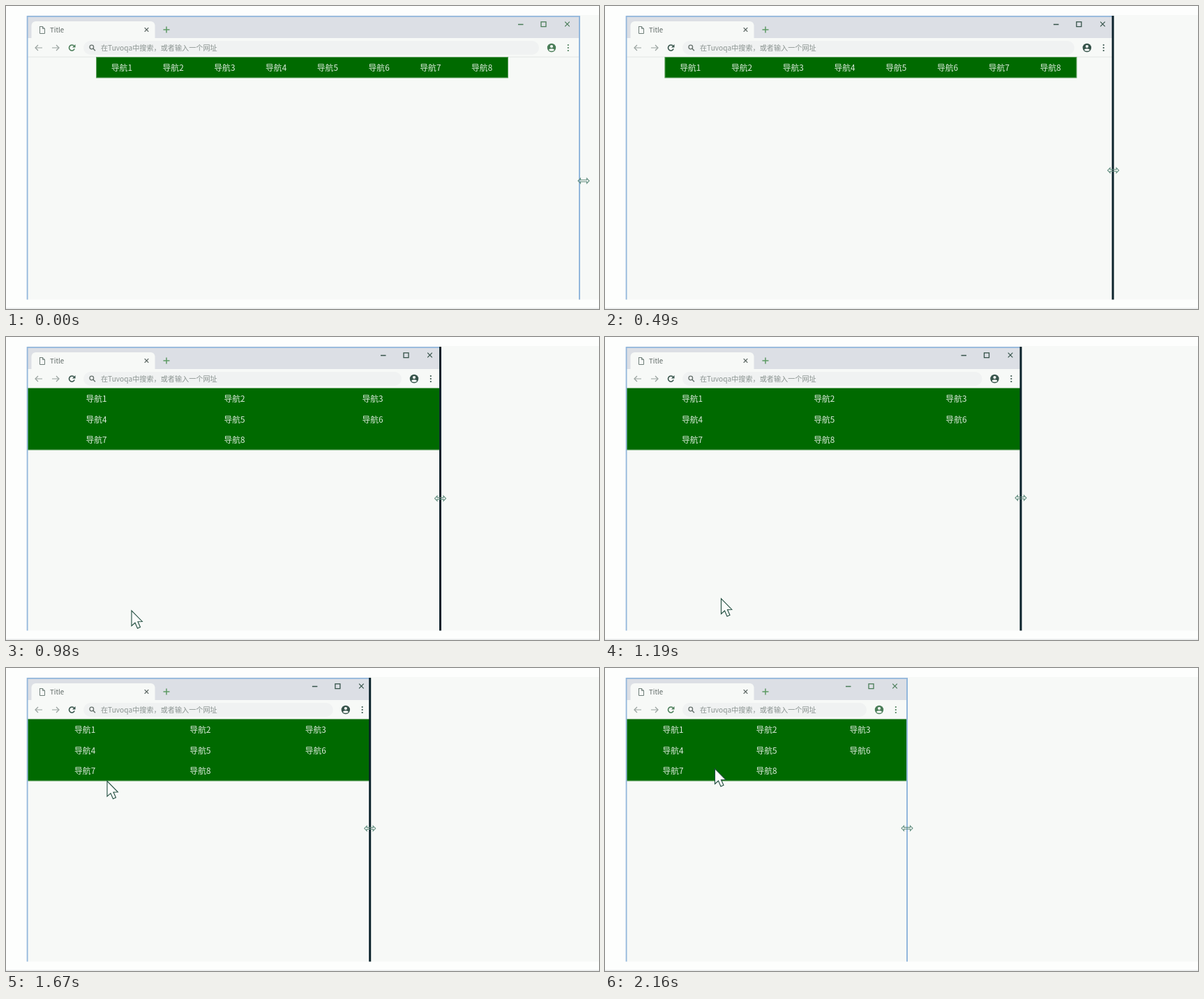
Write an HTML page with a canvas that moves like this. It is 850 px wide and 435 px high and loops after 2230 ms.

```html
<!DOCTYPE html>
<html lang="zh">
<head>
<meta charset="utf-8">
<title>Responsive navigation</title>
<style>
html, body { margin: 0; width: 100%; height: 100%; overflow: hidden; background: #fdfefd; }
canvas { display: block; }
</style>
</head>
<body>
<canvas id="stage" width="850" height="435"></canvas>
<script>
const ctx = document.getElementById('stage').getContext('2d');
const LOOP = 2230, STEP = 70, LAYOUT_DELAY = 20;
const LEFT = 31, TOP = 15, BOTTOM = 421.5;
const NAV_WIDTH = 590, BREAKPOINT = 600, NAV_TOP = 73.5, ROW = 29.5;
const FONT = '"Noto Sans CJK SC", "Noto Sans CJK", "Noto Sans", sans-serif';
const PAPER = '#f7f9f7', BLUE = '#93b7dc';

// Key points: time, then the values at that time
const edgePath = [
  [-20, 818], [0, 822], [140, 825], [280, 758], [490, 728], [770, 649],
  [1190, 596], [1470, 558], [1740, 488], [1880, 478], [2020, 433]
];
const pointerPath = [[910, 184, 398], [1190, 166, 375], [1470, 131, 181], [1740, 157, 144]];

function sample(keys, t) {
  const next = keys.findIndex(k => k[0] > t);
  if (next < 0) return keys[keys.length - 1].slice(1);
  const a = keys[Math.max(next - 1, 0)], b = keys[next];
  const p = a === b ? 0 : (t - a[0]) / (b[0] - a[0]);
  return a.slice(1).map((v, i) => v + (b[i + 1] - v) * p);
}

function rect(x, y, w, h, color) {
  ctx.fillStyle = color;
  ctx.fillRect(x, y, w, h);
}

function round(x, y, w, h, r, color) {
  ctx.fillStyle = color;
  ctx.beginPath();
  ctx.roundRect(x, y, w, h, r);
  ctx.fill();
}

function line(points, color, width = 1.2) {
  ctx.strokeStyle = color;
  ctx.lineWidth = width;
  ctx.beginPath();
  points.forEach(([x, y]) => ctx.lineTo(x, y));
  ctx.stroke();
}

function arc(x, y, r, color, width, from = 0, to = Math.PI * 2) {
  ctx.strokeStyle = color;
  ctx.lineWidth = width;
  ctx.beginPath();
  ctx.arc(x, y, r, from, to);
  ctx.stroke();
}

function oval(x, y, rx, color, ry = rx) {
  ctx.fillStyle = color;
  ctx.beginPath();
  ctx.ellipse(x, y, rx, ry, 0, 0, Math.PI * 2);
  ctx.fill();
}

function polygon(points, fill, stroke) {
  ctx.beginPath();
  points.forEach(([x, y]) => ctx.lineTo(x, y));
  ctx.closePath();
  if (fill) {
    ctx.fillStyle = fill;
    ctx.fill();
  }
  if (stroke) {
    ctx.strokeStyle = stroke;
    ctx.lineWidth = 1.1;
    ctx.stroke();
  }
}

function text(str, x, y, font, color, align = 'left') {
  ctx.font = `${font} ${FONT}`;
  ctx.textAlign = align;
  ctx.fillStyle = color;
  ctx.fillText(str, x, y);
}

function cross(x, y, r, color) {
  line([[x - r, y - r], [x + r, y + r]], color);
  line([[x - r, y + r], [x + r, y - r]], color);
}

function drawTabs(right, ink) {
  rect(LEFT, TOP, right - LEFT, 31, '#dcdfe5');
  round(36.5, 22, 177, 30, [6, 6, 0, 0], PAPER);
  line([[48.5, 29.5], [52.5, 29.5], [55.5, 32.5], [55.5, 39.5], [48.5, 39.5], [48.5, 29]], '#6f7f79', 1);
  line([[52.5, 29.5], [52.5, 32.5], [55.5, 32.5]], '#6f7f79', 1);
  text('Title', 63, 38, '9.6px', '#5c6663');
  cross(201.5, 34, 2.8, '#56615d');
  line([[225.5, 34], [234.5, 34]], '#5c9a63', 1.5);
  line([[230, 29.5], [230, 38.5]], '#5c9a63', 1.5);

  line([[right - 88, 26.5], [right - 80.5, 26.5]], ink, 1.3);
  ctx.strokeRect(right - 55, 22.8, 7, 6.8);
  cross(right - 17.5, 26, 3.3, ink);
}

function drawToolbar(right, ink) {
  rect(LEFT, 46, right - LEFT, 27, PAPER);
  round(111, 50, right - 58 - 111, 20, 10, '#f0f2f2');
  for (const [x, dir] of [[47, -1], [71, 1]]) {
    line([[x - 5 * dir, 60], [x + 4.5 * dir, 60]], '#98a19e');
    line([[x + dir, 56], [x + 5 * dir, 60], [x + dir, 64]], '#98a19e');
  }
  arc(94.5, 60, 4, ink, 1.6, 0.4, 5.5);
  polygon([[99.5, 55], [99.5, 59.5], [95, 59.5]], ink);

  arc(122.8, 59, 2.8, '#66716d', 1.3);
  line([[124.8, 61], [128, 64.3]], '#66716d', 1.4);
  text('在Tuvoqa中搜索，或者输入一个网址', 136, 64, '10.15px', '#8a9390');

  const avatar = right - 40;
  oval(avatar, 60, 6.2, ink);
  oval(avatar, 58, 2.1, PAPER);
  oval(avatar, 63, 3.7, PAPER, 1.7);
  for (const y of [56, 60, 64]) oval(right - 16.2, y, 1.1, ink);
  rect(LEFT, 72.7, right - LEFT, 0.8, '#dde2df');
}

function drawNav(right) {
  const room = right - LEFT, wide = room > BREAKPOINT;
  const columns = wide ? 8 : 3;
  const width = wide ? NAV_WIDTH : room;
  const left = LEFT + (room - width) / 2;
  const height = ROW * Math.ceil(8 / columns);
  const cell = width / columns;
  rect(left, NAV_TOP, width, height, '#006a00');
  ctx.strokeStyle = '#62a362';
  ctx.lineWidth = 1;
  ctx.strokeRect(left, NAV_TOP, width, height);
  for (let i = 0; i < 8; i++) {
    const x = left + (i % columns + 0.5) * cell - 0.5;
    const y = NAV_TOP + Math.floor(i / columns) * ROW + 19.6;
    text('导航' + (i + 1), x, y, '500 11.8px', '#dcebdc', 'center');
  }
}

function drawHandle(x, y) {
  const half = [[-4.5, -1.2], [-4.5, -3.6], [-8, 0], [-4.5, 3.6], [-4.5, 1.2]];
  const mirrored = half.map(([px, py]) => [-px, -py]);
  polygon([...half, ...mirrored].map(([px, py]) => [x + px, y + py]), null, '#638f80');
}

function drawPointer(x, y) {
  const outline = [[0.5, 0.5], [0.5, 22.5], [5.5, 18], [9, 26], [13, 24.2], [9.5, 16.5], [15.8, 16.2]];
  polygon(outline.map(([px, py]) => [x + px, y + py]), '#fbfdfb', '#204c3e');
}

function draw(t) {
  const [edge] = sample(edgePath, t);
  const [pageRight] = sample(edgePath, t - LAYOUT_DELAY);
  const frameRight = Math.max(edge, pageRight);
  const shrinking = pageRight > edge;
  const ink = shrinking ? '#36534a' : '#4a7d58';

  rect(0, 0, 850, 435, '#fdfefd');
  rect(LEFT, 13, 850 - LEFT, BOTTOM - 13, PAPER);
  rect(0, 433.5, 850, 1.5, '#e8eaea');

  ctx.save();
  ctx.beginPath();
  ctx.rect(LEFT, TOP, edge - LEFT, BOTTOM - TOP);
  ctx.clip();
  drawTabs(frameRight, ink);
  drawToolbar(frameRight, ink);
  drawNav(pageRight);
  ctx.restore();

  const edgeWidth = shrinking ? 3 : 2;
  rect(30, 14, edge - 30, 1.8, BLUE);
  rect(29.7, 14, 1.8, BOTTOM - 14, BLUE);
  rect(edge - edgeWidth / 2, 14, edgeWidth, BOTTOM - 14, shrinking ? '#0b222b' : BLUE);

  drawHandle(edge + 6 * Math.exp(-t / 200), 230 + 21 * Math.exp(-t / 390));
  if (t >= pointerPath[0][0]) drawPointer(...sample(pointerPath, t));
}

const REPEATED = [140, 350, 1810, 2090];

function stepTime(t) {
  const offset = t < 1740 ? 0 : 10;
  const time = Math.floor((t + offset) / STEP) * STEP - offset;
  return REPEATED.includes(time) ? time - STEP : time;
}

function tick() {
  draw(stepTime(performance.now() % LOOP));
  requestAnimationFrame(tick);
}
tick();
</script>
</body>
</html>
```
